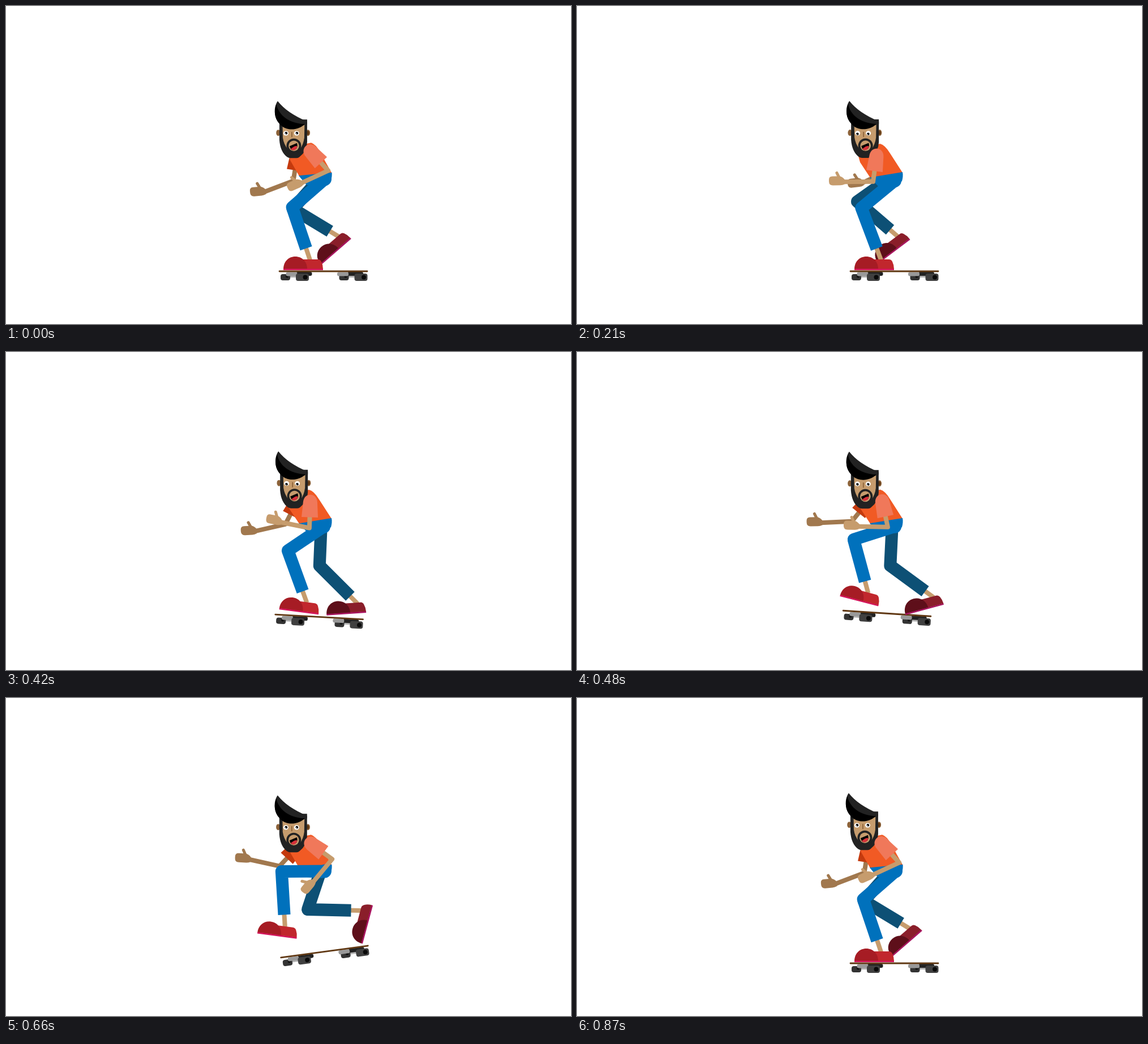
Animation of 998x561 px, one loop 0.9 s. Source, as an HTML page with a canvas:

```html
<!DOCTYPE html>
<html lang="en">
<head>
<meta charset="utf-8">
<title>Skater</title>
<style>
  html, body { margin: 0; width: 100%; height: 100%; overflow: hidden; background: #fff; }
  canvas { display: block; }
</style>
</head>
<body>
<canvas id="stage" width="998" height="561"></canvas>
<script>
const ctx = document.getElementById('stage').getContext('2d');
const LOOP = 900, SPAN = 870, STEP = 30, RAD = Math.PI / 180;
const HOP_START = 395, HOP_END = 850;

const cos = deg => Math.cos(deg * RAD), sin = deg => Math.sin(deg * RAD);
const clamp = (v, lo, hi) => Math.max(lo, Math.min(hi, v));
const polar = ([x, y], deg, len) => [x + len * cos(deg), y + len * sin(deg)];

// Cyclic swing: a base wave plus an optional wave of double speed, phases in degrees.
const wave = (mid, amp, phase, amp2 = 0, phase2 = 0) => t => {
  const a = 360 * t / SPAN;
  return mid + amp * cos(a - phase) + amp2 * cos(2 * a - phase2);
};

const headX = wave(1, 0.9, 130);
const headY = wave(3.2, 4.4, 208, 0.9, 10);
const gaze = wave(0.8, 1.1, 125);
const sway = wave(1.8, 2.8, 320);
const shoulderX = wave(536, 5, 270, 2);
const nearUpper = wave(68, 37, 124);
const nearLower = wave(164, 30, 125, 9, 20);
const farUpper = wave(97, 50, 257, 15, -30);
const farLower = wave(169, 20, 255, 5, 160);

// The pushing foot: time, ankle x, ankle y, foot angle.
const pushKeys = [
  [0, 588, 407, -41], [210, 567, 407, -37], [330, 616, 445, -7], [390, 618, 446, -2],
  [480, 630, 433, -15], [570, 639, 402, -48], [660, 628, 375, -75], [750, 613, 391.5, -61]
];

// Smooth cyclic path through the keys, without overshoot.
function pushFoot(t) {
  const n = pushKeys.length;
  const val = (i, c) => pushKeys[(i + n) % n][c] + (c ? 0 : SPAN * Math.floor(i / n));
  const rate = (i, c) => (val(i + 1, c) - val(i, c)) / (val(i + 1, 0) - val(i, 0));
  const slope = (i, c) => {
    const a = rate(i - 1, c), b = rate(i, c);
    return a * b <= 0 ? 0 : 2 * a * b / (a + b);
  };
  let i = 0;
  while (val(i + 1, 0) <= t) i++;
  const h = val(i + 1, 0) - val(i, 0), u = (t - val(i, 0)) / h, v = 1 - u;
  return [1, 2, 3].map(c =>
    v * v * (1 + 2 * u) * val(i, c) + u * u * (3 - 2 * u) * val(i + 1, c)
    + h * u * v * (v * slope(i, c) - u * slope(i + 1, c)));
}

function shape(color, d) {
  ctx.fillStyle = color;
  ctx.fill(new Path2D(d));
}

function oval(color, x, y, rx, ry = rx) {
  ctx.fillStyle = color;
  ctx.beginPath();
  ctx.ellipse(x, y, rx, ry, 0, 0, 7);
  ctx.fill();
}

function bar(color, x, y, w, h, r) {
  ctx.fillStyle = color;
  ctx.beginPath();
  ctx.roundRect(x, y, w, h, r);
  ctx.fill();
}

function line(color, width, points, cap = 'butt') {
  ctx.strokeStyle = color;
  ctx.lineWidth = width;
  ctx.lineCap = cap;
  ctx.lineJoin = 'round';
  ctx.beginPath();
  points.forEach(p => ctx.lineTo(...p));
  ctx.stroke();
}

function at(x, y, deg, draw) {
  ctx.save();
  ctx.translate(x, y);
  ctx.rotate(deg * RAD);
  draw();
  ctx.restore();
}

// follow: how far the hand turns along with the forearm.
function arm(shoulder, upper, lower, skin, sleeve, reach, follow) {
  const elbow = polar(shoulder, upper, 46);
  const wrist = polar(elbow, lower, reach);
  line(skin, 8, [polar(shoulder, upper, 20), elbow, wrist]);
  at(...wrist, 180 + (lower - 180) * follow, () => {
    line(skin, 5, [[6, 6], [11, 16]], 'round');
    shape(skin, 'M-3 -4 Q1 -6 5 -6 H18 Q25 -6 25 1 V4 Q25 10 19 10 H6 Q1 9 -3 4Z');
  });
  at(...shoulder, upper, () => shape(sleeve, 'M27 -14.5 L0 -12.5 C-17 -11 -17 11 0 12.5 L27 14.5Z'));
}

function shoe(x, y, deg, body, toe, sole) {
  at(x, y, deg, () => {
    shape(body, 'M-20 16 V-1 H14 Q18 -1 20 3 Q23 9 23 16Z');
    shape(toe, 'M-47 16 C-47 3 -38 -6 -26 -6 C-14 -6 -5 3 -5 16Z');
    shape(sole, 'M-47 15.5 H23 V18 H-47Z');
  });
}

// The knee follows from hip and ankle by the law of cosines.
function leg(hip, ankle, shin, cloth) {
  const thigh = 76;
  const dx = ankle[0] - hip[0], dy = ankle[1] - hip[1], d = Math.hypot(dx, dy);
  const bend = Math.acos(clamp((thigh ** 2 + d * d - shin ** 2) / (2 * thigh * d), -1, 1));
  const knee = polar(hip, (Math.atan2(dy, dx) + bend) / RAD, thigh);
  const dir = Math.atan2(ankle[1] - knee[1], ankle[0] - knee[0]) / RAD;
  line('#c69c6d', 8, [knee, ankle]);
  oval(cloth, ...hip, 12);
  line(cloth, 22, [hip, knee, polar(knee, dir, 76.5)]);
}

function board(x, y, tilt) {
  at(x, y, tilt, () => {
    [[0, 0], [90.5, 103.5]].forEach(([plate, wheel]) => {
      bar('#b3b3b3', wheel - 62, 6, 18, 5, 1);
      bar('#333', wheel - 75.5, 5, 17, 11, 4);
      oval('#111', wheel - 64, 9, 2.5);
      bar('#222', plate - 48, 1, 28, 7, 3);
      bar('#999', plate - 66, 1.5, 20, 7, 3);
      bar('#404040', wheel - 48.5, 4, 23, 13, 4);
      oval('#0a0a0a', wheel - 32, 10.5, 4);
    });
    line('#603813', 2.8, [[-77.5, 0], [77.5, 0]], 'round');
  });
}

function head(x, y, look) {
  at(x, y, 0, () => {
    [480.5, 533].forEach(ex => oval('#8c6239', ex, 223.5, 3.7, 5.5));
    oval('#603813', 533, 223.5, 2, 3.5);
    shape('#222', 'M482.5 200 H531.5 V240 Q531 256 518 266 Q516 268 513 268 H502 Q499 268 496 266 Q484 257 482.5 236Z');
    shape('#c69c6d', 'M488 204 H527 L526.5 232 Q525 244 519 252 H497 Q490 243 488.5 232Z');
    line('#8c6239', 1.8, [[504.5, 222], [504.5, 231]]);
    oval('#222', 508, 246.5, 13);
    oval('#c69c6d', 508, 246.5, 9.3);
    shape('#000', 'M500.5 247 L513.5 241.5 Q516 249 511 252.5 Q505 256 502.5 252Z');
    shape('#d6303a', 'M502.5 251.5 Q505 250 508 248 Q511 246.5 514 247 Q513.5 252 509 254 Q505 255.5 502.5 251.5Z');
    [494, 513].forEach(ex => {
      oval('#fff', ex, 224.3, 4.5, 4.1);
      oval('#000', ex + 0.5 - look / 2, 224 + look, 2.3);
      oval('#fff', ex - 0.4 - look / 2, 225 + look, 0.8);
    });
    shape('#222', 'M479.5 167.5 C491 182 507 193 531.5 203.5 V208 L520 212 L484 208 C472 197 472 178 479.5 167.5Z');
    shape('#000', 'M477 173 C481 192 499 207 527 208 C519 217 505 219 495 216 Q487 213 483 208 C473 198 473 184 477 173Z');
  });
}

function draw(t) {
  ctx.fillStyle = '#fff';
  ctx.fillRect(0, 0, 998, 561);

  const lean = Math.max(0, sway(t));
  const leaning = (color, d) => at(563, 300, lean, () => {
    ctx.translate(-563, -300);
    shape(color, d);
  });

  // The hop lifts front foot and board; a short kick tips the board at its start.
  const hop = clamp((t - HOP_START) / (HOP_END - HOP_START), 0, 1);
  const rise = sin(180 * hop);
  const kick = Math.exp(-(((t - 458) / 40) ** 2));
  const lift = 46 * rise ** 1.2;
  const front = [537 - lift, 448 - lift];
  const [px, py, turn] = pushFoot(t);
  const heel = polar(polar([px, py], turn, -9), turn + 90, -1);

  board(560.5 - 19 * kick + 2 * rise, 468 - 22 * rise ** 2, 11 * kick - 8 * rise);
  arm([514.5, 263], farUpper(t), farLower(t), '#a1784e', '#c43a0e', 55, 0.25);
  leg([557, 301], [px, py], 95, '#0d5075');
  shoe(...heel, turn, '#8a1e2a', '#5e0f1a', '#a8135f');
  leaning('#f15a24', 'M496 262 L500 276 L518 303 L575 294 L553 260 Q544 245 535 243 L510 250Z');
  leaning('#0071bc', 'M517 302.5 L575 293 Q576.5 300 574 309 L560 318 L532 318Z');
  leg([561 + 0.5 * lean, 308 - 0.7 * lean], front, 98, '#0071bc');
  shoe(...front, 18 * (1 - hop) * Math.min(1, 8 * hop), '#c1272d', '#a61c24', '#d4145a');
  head(headX(t), headY(t), Math.max(0, gaze(t)));
  arm([shoulderX(t), 264.5 - 2 * lean], nearUpper(t), nearLower(t), '#c69c6d', '#f0785a', 53, 1);
}

function tick(now) {
  draw(Math.floor((now % LOOP) / STEP) * STEP % SPAN);
  requestAnimationFrame(tick);
}
draw(0);
requestAnimationFrame(tick);
</script>
</body>
</html>
```
